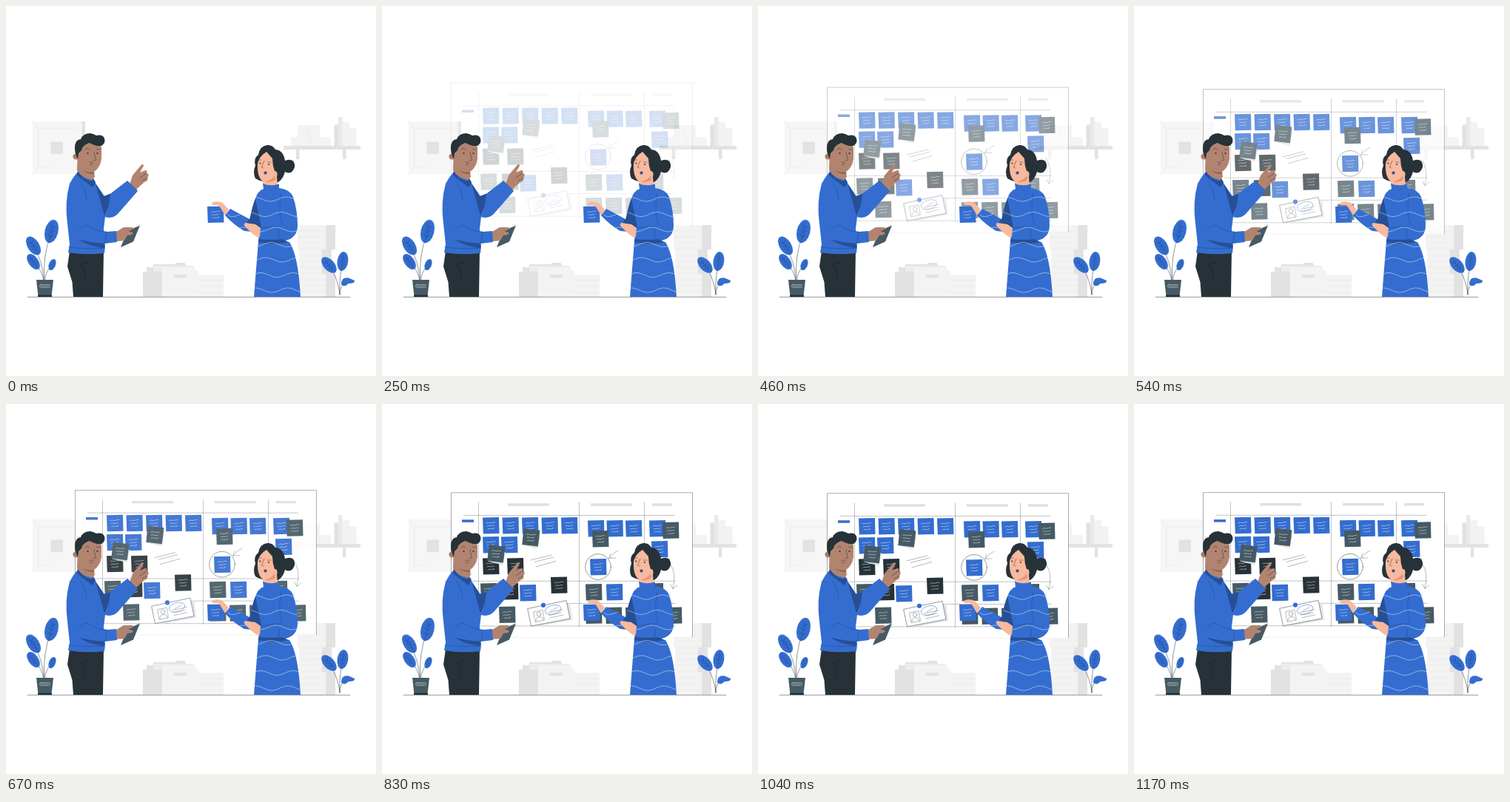
An HTML page for the animation above (1210 ms loop, 500 px wide and 500 px high).

```html
<!DOCTYPE html>
<html lang="en">
<head>
<meta charset="utf-8">
<title>Planning board</title>
<style>
html, body { margin: 0; width: 100%; height: 100%; overflow: hidden; background: #fff; }
svg { display: block; width: 100%; height: 100%; }
.blue { fill: #346dcf; }
.navy { fill: #264f96; }
.dark { fill: #263238; }
.slate { fill: #455a64; }
.tan { fill: #b28470; }
.peach { fill: #f8b99d; }
.pale { fill: #f3f3f3; }
.mid { fill: #e2e2e2; }
.line, .white, .grey, .seam { fill: none; stroke-linecap: round; stroke-linejoin: round; }
.line { stroke: #263238; stroke-width: .5; }
.white { stroke: #fff; stroke-width: .45; }
.grey { stroke: #e2e2e2; stroke-width: .5; }
.seam { stroke: #1f4489; stroke-width: .5; }
</style>
</head>
<body>
<svg viewBox="0 0 500 500">
  <defs>
    <path id="dress" d="M347 240Q358 236 369 241V246Q384 248 388 258Q394 276 394 297Q394 315 373 318L383 319Q395 337 398 393H335L341 318L342 306L322 304Q308 296 296 283L303 274Q318 282 329 288L336 264Q339 250 348 247Z"/>
    <clipPath id="dressClip"><use href="#dress"/></clipPath>
  </defs>

  <!-- room -->
  <path fill="#f6f6f6" d="M36 156H103V227H36Z"/>
  <path class="mid" d="M102.500 156H107V227H102.500ZM60.500 183.500H77V200H60.500Z"/>
  <path class="grey" d="M36 156L44 166H95L103 156M36 227L44 218H60M44 166V218"/>
  <path class="mid" d="M375 189H479V194H375ZM392 194H396.500V207H392ZM455 194H459.500V207H455ZM443.500 160.500H449V189H443.500Z"/>
  <path class="pale" d="M385 177H439V189H385ZM394 161H424V177H394ZM454 157H464V189H454ZM464 165H474V189H464Z"/>
  <path fill="#e9e9e9" d="M449 150H454.500V189H449Z"/>
  <path class="grey" d="M411 177V189M409 161V177M464 166V189"/>
  <g id="stacks"></g>
  <path class="mid" d="M185 359H211V393H185ZM190 353H199V359H190ZM199 349H243V353H199ZM229 347H242V349H229Z"/>
  <path fill="#ececec" d="M199 351H253V359H199Z"/>
  <path class="pale" d="M211 358H260V393H211ZM211 353H256V358H211Z"/>
  <path class="mid" d="M227 363H244V367.500H227Z"/>

  <!-- plants -->
  <path class="line" d="M52 371Q49 340 61 305M51 371Q50 345 37 324M51 371Q49 358 38 346M52 371Q54 358 62 350M451 390Q450 368 455 345M451 390Q450 372 437 350M451 390Q451 378 459 373"/>
  <g id="leaves" class="blue"></g>
  <path class="slate" d="M41 370H64L61.500 392H43.500Z"/>
  <path class="dark" d="M43 390.500H62V393H43Z"/>
  <rect class="white" x="45.500" y="376.500" width="14" height="4" rx="2"/>
  <path class="white" d="M48 378.500H57"/>
  <path class="blue" d="M453 376Q453 366 463 367.500L471 371Q472 375 463 375L459 378Q455 379 453 376Z"/>

  <g id="board" opacity="0">
    <path fill="#fff" d="M93.500 120.800H419.500V316.800H93.500Z"/>
    <path class="grey" d="M93.500 316.500H419.500"/>
    <path class="line" style="stroke-width:.4" d="M93.500 316V120.800H419.500V316"/>
    <path fill="#e0e0e0" d="M170 135.300H226V138.700H170ZM282 135.300H338V138.700H282ZM365 135.300H392V138.700H365Z"/>
    <path class="blue" d="M108 157.300H124V160.800H108Z"/>
    <path class="line" style="stroke-width:.3" d="M111 151.500H395M130.500 134V302M266.500 134V302M354.500 134V240M122 240.300H396M248 270.500H396M132 301H396"/>
    <g id="notes"></g>
    <circle class="line" cx="292" cy="221" r="17.300"/>
    <path class="line" style="stroke-width:.35" d="M201 212L229 205M206 214.500L232 208M208 221L235 213.500M319 199Q313 202 307 209M309 203L306.500 209.500L316 209M389 216Q399 231 393 250M390 245L393 251L399 246"/>
    <path class="mid" d="M202 282L254 270L257 293L206 302Z"/>
    <path class="line" style="fill:#fff" d="M197 277.500L249 266.500L254 291L202 301Z"/>
    <path class="line" style="stroke-width:.35" d="M205 282L217 279.500L219.500 293L207.500 295.500ZM208 295Q208 289 212 289Q217 288 218 293M225 283L244 279M226 286.500L242 283M227 290L245 286M228 281L237 276"/>
    <circle class="line" style="stroke-width:.35" cx="212" cy="285" r="2.800"/>
    <ellipse cx="231" cy="279" rx="11" ry="6" transform="rotate(-15 231 279)" fill="none" stroke="#346dcf" stroke-width=".5"/>
    <circle class="blue" cx="218" cy="272.800" r="3.100"/>
  </g>

  <path class="line" d="M29 393.300H465"/>

  <!-- man -->
  <g>
    <path class="dark" d="M86 331H132L131 393H91L89.500 373L83 352Z"/>
    <path d="M99 352Q104 347 113 346M104 352Q108 361 106 371" fill="none" stroke="#111a1f" stroke-width=".5"/>
    <path class="tan" d="M167 241L171 229L183 214.500Q186 213 186 216L181 225L188 222Q192 222 190 226Q195 227 191 232Q193 236 187 238L178 246L174 251Z"/>
    <path class="line" d="M190 226L181 232M191 232L184 236"/>
    <path class="blue" d="M97 224L118 234L122 241L133 257L142 253L164 236L178 250L151 281Q144 288 134 285L132 301L134 325L133 334Q107 337 84 333L86 322L83 294Q79 265 86 240Q90 232 97 224Z"/>
    <path class="navy" d="M121 240L132 257L141 254L139 269L133 283L128 265ZM97 315L133 320V327Q112 325 97 315Z"/>
    <path class="slate" d="M164 304L181 296.500L172 318.500L155 326Z"/>
    <path class="tan" d="M149 305L159 299L171 299Q174 302 165 304L171 306Q174 309 164 310L160 317L149 318Z"/>
    <path class="blue" d="M100 295L111 296Q120 305 137 305L149 304L150 319L134 321Q109 319 97 315L85 307Z"/>
    <path class="seam" d="M85 326Q108 329 133 327M98 302Q104 296 111 296Q121 305 136 305L134 320M164 237L177 249M101 240Q108 248 109 262"/>
    <path class="tan" d="M97 190L96 222Q100 231 116 235L120 231L119 224Q127 219 129 207V190L116 184Z"/>
    <path fill="#8d604f" d="M104 222Q112 226 119 224V227Q109 227 104 222Z"/>
    <circle class="tan" cx="94.500" cy="203.500" r="4"/>
    <path class="dark" d="M97 207L93.500 198Q91 181 101 180Q104 172 114 172Q119 173 122 175Q131 173 133 179Q135 185 129 189Q121 190 113 185Q103 188 102 195L98 199Z"/>
    <path class="navy" d="M97 223L96 229L117 245L121 238L118 233L116 237Q104 235 97 223Z"/>
    <path class="line" d="M119 197Q120 204 121.500 208L118 209M107 194Q110 191 113 194M122 194Q125 192 127 194M113 212Q115 209.500 118 212M113 214Q115 216.500 117 213.500M92 203Q95 201 96 205"/>
    <path class="line" style="stroke-width:2.200" d="M110.500 199h0M123.500 199h0"/>
  </g>

  <!-- woman -->
  <g>
    <g id="held"></g>
    <path class="peach" d="M301 275L292 265.500Q283 263 278 266L279 269H287L290 273L296 283Z"/>
    <path class="dark" d="M337 233Q333 224 337 216Q334 206 341 201Q343 189 353 188Q360 187 364 194Q375 195 377 209Q391 204 390 218Q386 229 377 224Q375 233 368 238Q347 240 337 233Z"/>
    <use href="#dress" class="blue"/>
    <path class="navy" d="M337 260L345 299L334 302L325 293L330 287Q332 272 337 260ZM342 315Q357 317 373 315L382 319Q363 323 341 319Z"/>
    <path class="seam" d="M372 254Q367 275 373 295M371 297L345 300M366 297Q371 306 368 315"/>
    <path class="white" id="waves" clip-path="url(#dressClip)"/>
    <path class="peach" d="M344 300L337 295L324 293Q320 294 323 298L331 306L339 312H343Z"/>
    <path class="peach" d="M352 197Q342 203 340 213Q339 231 347 237V240Q357 244 367 241L366 231Q368 223 363 223Q360 215 360 206Z"/>
    <path fill="#e5947a" d="M350 237Q359 236 363 229L364 235Q357 240 350 237Z"/>
    <path class="line" d="M349 209Q346 216 345.500 218L348 219M341 208H345M353 211H358"/>
    <path class="line" style="stroke-width:2" d="M343.500 212.500h0M355 214h0"/>
    <path class="navy" d="M348 225L351 223L353 226L350 228Z"/>
  </g>
</svg>
<script>
const $ = id => document.getElementById(id);
const repeat = (count, make) => Array.from({ length: count }, (_, i) => make(i)).join("");

// Piles of paper: a light block with a darker end and evenly spaced sheets
function pile(x, y, width, height, end = 0) {
  return `<path class="pale" d="M${x} ${y}h${width}v${height}h${-width}z"/>` +
    `<path class="mid" d="M${x + width - end} ${y}h${end}v${height}h${-end}z"/>` +
    `<path class="grey" d="${repeat(Math.floor(height / 8), i => `M${x + 2} ${y + 8 * (i + 1)}h${width - 1}`)}"/>`;
}
$("stacks").innerHTML = pile(394, 296, 51, 33, 13) + pile(396, 329, 44, 33, 13) +
  pile(394, 362, 51, 31, 13) + pile(258, 363, 36, 30);

function leaf(x, y, size, tilt) {
  const vein = i => `M-4 ${6 * i - 8}l4 4l4 -4`;
  return `<g transform="translate(${x} ${y}) rotate(${tilt}) scale(${size / 16})">` +
    `<ellipse rx="9" ry="16"/><path class="seam" d="M0 16V-11${repeat(3, vein)}"/></g>`;
}
$("leaves").innerHTML = leaf(61.5, 304.5, 16, 14) + leaf(37, 324, 14, -32) + leaf(37, 345.5, 12, -35) +
  leaf(62.5, 349.5, 8, 22) + leaf(455, 345, 13, 8) + leaf(436.5, 350, 13, -42);

// A row of sticky notes, each with three lines of handwriting
const writing = repeat(3, i => `M${5 + i} ${8 + 4 * i}q2 -1 4 -.4t4 -.4t${4 - 2 * i} -.3`);

function row(color, x, y, count = 1, step = 26.5, tilt = 0) {
  return repeat(count, i =>
    `<g transform="translate(${x + i * step} ${y}) rotate(${tilt} 11 11)">` +
    (tilt ? `<path class="mid" d="M4 4L24 8L22 25L2 23Z"/>` : "") +
    `<path class="${color}" d="M0 .5L22 0L22.500 22L.8 22.500Z"/><path class="white" d="${writing}"/></g>`);
}
$("notes").innerHTML =
  row("blue", 136, 154, 5) + row("blue", 278, 158, 3, 25.5) + row("blue", 361, 158) +
  row("blue", 136, 180, 2, 25) + row("blue", 364, 186) + row("blue", 281, 210) +
  row("dark", 136, 209, 2, 33) + row("dark", 162, 243) + row("dark", 228, 234.5) +
  row("blue", 186, 245) + row("slate", 275, 244) + row("blue", 303, 244) + row("slate", 358, 243) +
  row("slate", 133, 243) + row("slate", 158, 274.5) + row("slate", 275, 275.5, 5, 27) +
  row("slate", 379, 160.5) + row("slate", 284, 172) +
  row("slate", 190, 170, 1, 0, 8) + row("slate", 143, 192, 1, 0, 8);
$("held").innerHTML = row("blue", 272, 270.5);

// Dress pattern: wavy bands
$("waves").setAttribute("d", repeat(7, i =>
  `M300 ${261 + 20.5 * i}` + repeat(50, j => `L${302 + 2 * j} ${261 + 20.5 * i + 3 * Math.sin(j / 3.5 + i)}`)));

const LOOP = 1210, SLIDE = 970, FADE = 830, FLOAT_START = 1000, FLOAT = 750;
const ease = p => (1 - Math.cos(Math.PI * Math.min(1, Math.max(0, p)))) / 2;

// The board slides down while fading in, then starts to float up.
function draw(now) {
  const t = now % LOOP;
  const y = -20 * (1 - ease(t / SLIDE)) - 10 * ease((t - FLOAT_START) / FLOAT);
  $("board").setAttribute("transform", `translate(0 ${y.toFixed(2)})`);
  $("board").setAttribute("opacity", ease(t / FADE).toFixed(3));
}

const start = performance.now();
function tick() {
  draw(performance.now() - start);
  requestAnimationFrame(tick);
}
tick();
</script>
</body>
</html>
```
